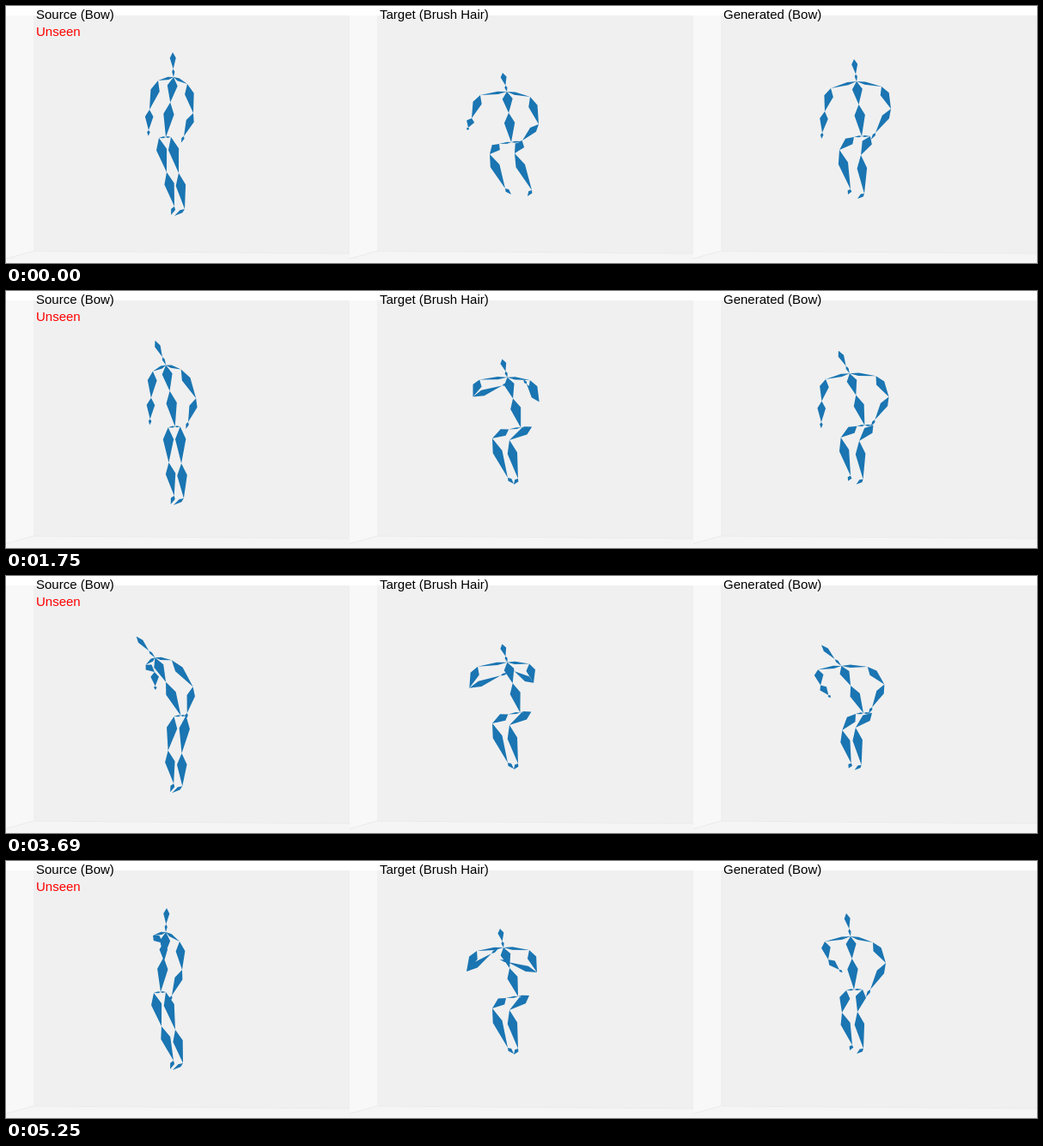
Recreate the animation shown at these times as an HTML page. Size 1200 px wide and 300 px high, loop 5310 ms.

```html
<!DOCTYPE html>
<html lang="en">
<head>
<meta charset="utf-8">
<title>Motion retargeting</title>
<style>
  html, body { margin: 0; width: 100%; height: 100%; overflow: hidden; background: #fff; }
  svg { display: block; width: 100vw; height: 100vh; }
  text { font: 15px "Liberation Sans", Arial, sans-serif; }
  .bones { fill: #1a75b2; }
</style>
</head>
<body>
<svg viewBox="0 0 1200 300">
  <defs>
    <g id="room">
      <path fill="#f5f5f5" d="M0 11H400V300H0z"/>
      <path fill="#f8f8f8" d="M0 11H32V286L0 295z"/>
      <path fill="#f0f0f0" d="M32 11H400V289L32 286z"/>
      <path fill="none" stroke="#ebebeb" d="M0 295L32 286L400 289"/>
    </g>
  </defs>
  <use href="#room"/>
  <use href="#room" x="400"/>
  <use href="#room" x="800"/>
  <path class="bones" id="source"/>
  <path class="bones" id="target" transform="translate(400)"/>
  <path class="bones" id="generated" transform="translate(800)"/>
  <text x="35" y="15">Source (Bow)</text>
  <text x="35" y="35" fill="#f00">Unseen</text>
  <text x="435" y="15">Target (Brush Hair)</text>
  <text x="835" y="15">Generated (Bow)</text>
</svg>
<script>
const LOOP = 5310, STEP = 62.5, LAST = 5250;

const lerp = (a, b, u) => a + (b - a) * u;
const mix = (a, b, u) => [lerp(a[0], b[0], u), lerp(a[1], b[1], u)];
const shift = (p, [dx, dy]) => [p[0] + dx, p[1] + dy];

// Moves a joint from p to q on an arc around the pelvis.
function swing(p, q, from, to, pelvis, u) {
  const a = [p[0] - from[0], p[1] - from[1]], b = [q[0] - to[0], q[1] - to[1]];
  const start = Math.atan2(a[1], a[0]);
  let turn = Math.atan2(b[1], b[0]) - start;
  turn -= 2 * Math.PI * Math.round(turn / (2 * Math.PI));
  const r = lerp(Math.hypot(...a), Math.hypot(...b), u), angle = start + turn * u;
  return [pelvis[0] + r * Math.cos(angle), pelvis[1] + r * Math.sin(angle)];
}

function blend(a, b, u) {
  const pelvis = mix(a.pelvis, b.pelvis, u), pose = { pelvis };
  const move = (p, q) => swing(p, q, a.pelvis, b.pelvis, pelvis, u);
  for (const part of ["spine", "armL", "armR", "legL", "legR"])
    pose[part] = a[part].map((p, i) => move(p, b[part][i]));
  return pose;
}

// Finds the pair of keys around a time and how far it lies between them.
function between(keys, time) {
  const i = Math.max(1, keys.findIndex(k => k[0] >= time));
  const [a, b] = [keys[i - 1], keys[i]];
  return [a[1], b[1], (time - a[0]) / (b[0] - a[0])];
}

// Parts: spine = head, chest; arm = shoulder, elbow, wrist; leg = knee, ankle.
const sourceUp = {
  pelvis: [186, 153], spine: [[194, 54], [195, 83]],
  armL: [[177, 87], [167, 121], [166, 145]], armR: [[211, 91], [218, 125], [207, 152]],
  legL: [[187, 194], [196, 234]], legR: [[201, 195], [208, 237]]
};
const sourceBow = {
  pelvis: [227, 173], spine: [[126, 121], [165, 126]],
  armL: [[159, 136], [171, 147], [172, 171]], armR: [[184, 120], [228, 136], [228, 171]],
  legL: [[196, 208], [197, 245]], legR: [[214, 212], [207, 248]]
};
const sourceEnd = {
  pelvis: [180, 153], spine: [[187, 55], [186, 83]],
  armL: [[171, 87], [183, 96], [184, 117]], armR: [[202, 94], [205, 127], [193, 157]],
  legL: [[181, 193], [195, 233]], legR: [[197, 197], [206, 236]]
};

const generatedUp = {
  pelvis: [196, 152], spine: [[187, 62], [190, 88]],
  armL: [[160, 96], [953, 123].map((v, i) => i ? v : v - 800), [150, 148]], armR: [[219, 94], [230, 120], [212, 148]],
  legL: [[170, 168], [183, 214]], legR: [[195, 174], [199, 219]]
};
generatedUp.armL[1] = [153, 123];
const generatedBow = {
  pelvis: [209, 170], spine: [[127, 118], [166, 129]],
  armL: [[138, 131], [139, 149], [146, 169]], armR: [[199, 122], [222, 138], [211, 165]],
  legL: [[177, 179], [185, 220]], legR: [[198, 175], [197, 220]]
};
const generatedEnd = {
  pelvis: [187, 150], spine: [[178, 61], [183, 88]],
  armL: [[153, 94], [157, 115], [170, 127]], armR: [[209, 95], [224, 119], [206, 150]],
  legL: [[173, 177], [185, 215]], legR: [[191, 176], [198, 219]]
};

const seated = {
  pelvis: [188, 159], spine: [[178, 78], [183, 100]],
  armL: [[152, 104], [142, 131], [138, 142]], armR: [[210, 106], [220, 138], [201, 157]],
  legL: [[163, 173], [181, 213]], legR: [[192, 172], [212, 215]]
};
const raised = {
  pelvis: [200, 160], spine: [[178, 80], [184, 101]],
  armL: [[152, 103], [145, 121], [177, 106]], armR: [[210, 104], [220, 129], [211, 106]],
  legL: [[166, 172], [184, 218]], legR: [[186, 174], [196, 219]]
};
const brush = {
  ...raised, pelvis: [197, 158], spine: [[176, 78], [182, 100]],
  armL: [[149, 105], [140, 130], [179, 122]], armR: [[209, 104], [222, 131], [195, 117]]
};
const stroke = {
  ...raised, pelvis: [199, 160],
  armL: [[149, 106], [139, 131], [174, 114]], armR: [[209, 102], [210, 123], [190, 109]]
};
const rest = {
  ...raised, pelvis: [196, 158], spine: [[175, 79], [179, 101]],
  armL: [[148, 105], [136, 129], [165, 108]], armR: [[209, 104], [218, 130], [184, 118]]
};

// How deep the bow is over time, 0 upright to 1 fully bent.
const DEPTH = [[0, 0], [1312, 0.04], [1600, 0.06], [2187, 0.85], [2500, 0.97], [2937, 1],
  [3280, 1], [3687, 0.5], [3940, 0.24], [4437, 0.09], [LAST, 0]];
const BRUSHING = [[0, seated], [1312, raised], [2937, brush], [4000, stroke], [LAST, rest]];

const bowing = (up, bent, end) => time => {
  const depth = lerp(...between(DEPTH, time));
  return blend(time < 3100 ? up : end, bent, depth);
};

const figures = [
  { id: "source", hips: [[-8, 1], [6, 0]], toes: [[-4, 10], [-12, 8]],
    at: bowing(sourceUp, sourceBow, sourceEnd) },
  { id: "target", hips: [[-14, 2], [13, -1]], toes: [[7, 7], [-5, 7]],
    at: time => blend(...between(BRUSHING, time)) },
  { id: "generated", hips: [[-9, 1], [10, 0]], toes: [[-3, 6], [-8, 6]],
    at: bowing(generatedUp, generatedBow, generatedEnd) }
];

// A spindle from its thick end a to its thin end b, flattened by the view from above.
function bone(a, b, width) {
  const dx = b[0] - a[0], dy = b[1] - a[1], length = Math.hypot(dx, dy) || 1;
  const ox = -dy / length * width, oy = dx / length * width * 0.7;
  const c = mix(a, b, 0.34);
  return `M${a}L${c[0] + ox} ${c[1] + oy}L${b}L${c[0] - ox} ${c[1] - oy}z`;
}

function skeleton({ hips, toes }, { pelvis, spine: [head, chest], armL, armR, legL, legR }) {
  const neck = mix(head, chest, 0.67), waist = mix(chest, pelvis, 0.42);
  let d = bone(head, neck, 3.5) + bone(neck, chest, 1.6) + bone(chest, waist, 6) + bone(waist, pelvis, 6.2);
  for (const [shoulder, elbow, wrist] of [armL, armR])
    d += bone(chest, shoulder, 2.4) + bone(shoulder, elbow, 5.4) + bone(elbow, wrist, 4.8)
      + bone(wrist, mix(elbow, wrist, 1.28), 1.8);
  [legL, legR].forEach(([knee, ankle], i) => {
    const hip = shift(pelvis, hips[i]);
    d += bone(pelvis, hip, 1.4) + bone(hip, knee, 6.2) + bone(knee, ankle, 5.8)
      + bone(ankle, shift(ankle, toes[i]), 2.6);
  });
  return d;
}

for (const fig of figures) fig.path = document.getElementById(fig.id);

function draw(now) {
  const time = Math.min(LAST, Math.floor((now % LOOP + 3) / STEP) * STEP);
  for (const fig of figures) fig.path.setAttribute("d", skeleton(fig, fig.at(time)));
}

const start = performance.now();
function tick() {
  draw(performance.now() - start);
  requestAnimationFrame(tick);
}
tick();
</script>
</body>
</html>
```
